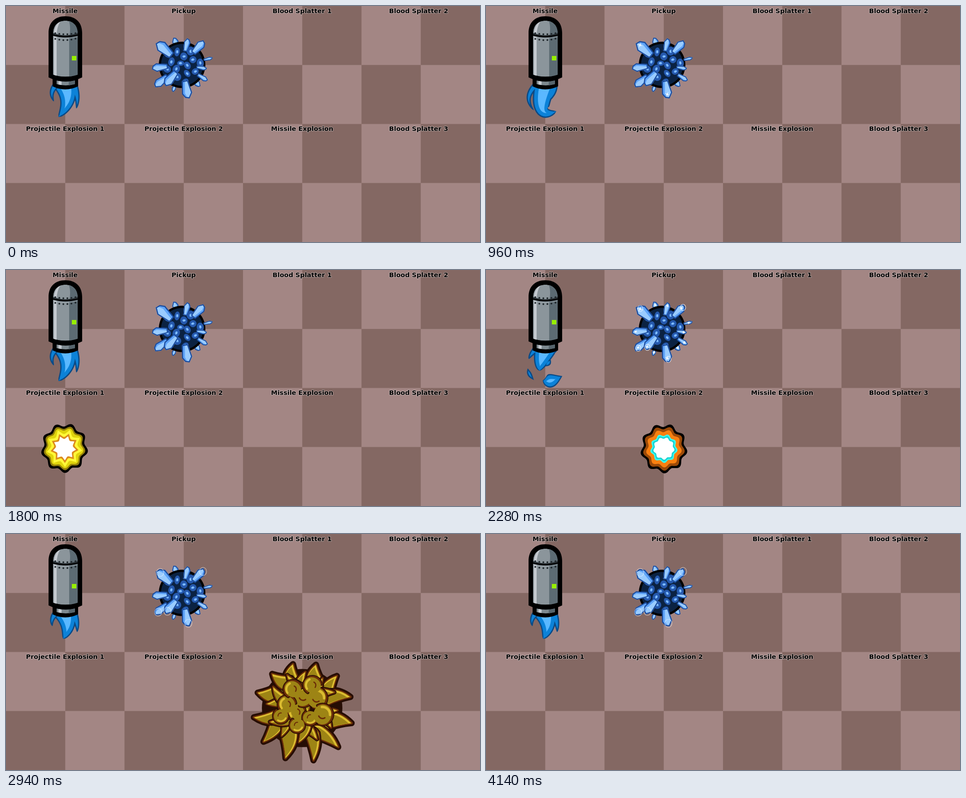
An HTML page with a canvas that plays this animation: 1058 by 529 pixels, repeating every 4.2 s.

```html
<!DOCTYPE html>
<html lang="en">
<head>
<meta charset="utf-8">
<title>Sprite sheet</title>
<style>
html, body { margin: 0; width: 100%; height: 100%; overflow: hidden; background: #846863; }
canvas { display: block; }
</style>
</head>
<body>
<canvas id="stage" width="1058" height="529"></canvas>
<script>
const g = document.getElementById('stage').getContext('2d');
const STEP = 60, STEPS = 70, CELL = 264.5, TAU = Math.PI * 2, GOLDEN = 2.4;

const LABELS = ['Missile', 'Pickup', 'Blood Splatter 1', 'Blood Splatter 2',
  'Projectile Explosion 1', 'Projectile Explosion 2', 'Missile Explosion', 'Blood Splatter 3'];
const LABEL_X = [132, 396.5, 661, 921];

const mix = (a, b, k) => a + (b - a) * k;
const polar = (x, y, angle, r) => [x + r * Math.cos(angle), y + r * Math.sin(angle)];

function fill(path, color, rule = 'nonzero') {
  g.fillStyle = color;
  g.fill(typeof path === 'string' ? new Path2D(path) : path, rule);
}
function line(path, color, width) {
  g.strokeStyle = color;
  g.lineWidth = width;
  g.stroke(typeof path === 'string' ? new Path2D(path) : path);
}
function oval(x, y, rx, ry = rx, turn = 0) {
  const p = new Path2D();
  p.ellipse(x, y, rx, ry, turn, 0, TAU);
  return p;
}
function arc(x, y, r, from, sweep) {
  const p = new Path2D();
  p.arc(x, y, r, from, from + sweep);
  return p;
}
function polygon(points) {
  const p = new Path2D();
  points.forEach(q => p.lineTo(...q));
  p.closePath();
  return p;
}
function random(seed) {
  return () => (seed = (seed * 16807) % 2147483647) / 2147483647;
}

function drawBoard() {
  const s = CELL / 2;
  for (let y = 0; y < 4; y++) for (let x = 0; x < 8; x++) {
    g.fillStyle = (x + y) % 2 ? '#846863' : '#a38684';
    g.fillRect(x * s, y * s, s + 1, s + 1);
  }
}

function drawLabels() {
  g.font = 'bold 14.4px "DejaVu Sans", sans-serif';
  g.textAlign = 'center';
  g.lineJoin = 'round';
  LABELS.forEach((text, i) => {
    const x = LABEL_X[i % 4], y = i < 4 ? 16 : 280;
    g.strokeStyle = 'rgba(255,255,255,.4)';
    g.lineWidth = 2;
    g.strokeText(text, x, y);
    g.fillStyle = '#000';
    g.fillText(text, x, y);
  });
}

// ---- Missile ----
// Each tongue bends from an early curve (control, end) to a late one.
const TONGUES = [
  { root: 111, width: 15, early: [96, 195, 107, 214], late: [82, 206, 107, 234] },
  { root: 151, width: 18, early: [163, 205, 157, 230], late: [154, 195, 138, 215] },
  { root: 132, width: 48, early: [148, 215, 117, 249], late: [108, 257, 157, 236] }
];

// Tapered strip along the part of a curve between two times.
function ribbon(root, [cx, cy, ex, ey], from, to, width, trim) {
  const left = [], right = [], n = 18;
  for (let i = 0; i <= n; i++) {
    const u = i / n, t = mix(from, to, u), s = 1 - t;
    const x = s * s * root + 2 * s * t * cx + t * t * ex;
    const y = s * s * 178 + 2 * s * t * cy + t * t * ey + (from ? 6 : 0);
    const angle = Math.atan2(s * (cy - 178) + t * (ey - cy), s * (cx - root) + t * (ex - cx)) + Math.PI / 2;
    const half = from ? width * .32 * Math.sin(Math.PI * u) : width / 2 * (1 - u) ** .6;
    const r = Math.max(0, half - trim / 2);
    left.push(polar(x, y, angle, r));
    right.unshift(polar(x, y, angle, -r));
  }
  return polygon([...left, ...right]);
}

function drawFlame(pose) {
  const young = pose === 9, k = young ? 0 : pose / 6, tear = young ? 0 : Math.max(0, pose - 6);
  const parts = tear ? [[0, .5 - .08 * tear], [.42 + .08 * tear, 1]] : [[0, young ? .8 : 1]];
  [['#0b4a86', 0], ['#0c82d8', 6], ['#5ab8ff', 23]].forEach(([color, trim]) => {
    TONGUES.forEach(({ root, width, early, late }) => {
      const curve = early.map((v, i) => mix(v, late[i], k));
      parts.forEach(([a, b]) => fill(ribbon(root, curve, a, b, width, trim), color));
    });
  });
}

function drawMissile() {
  fill('M95 160 V61 C95 36 110 23 132.5 23 C155 23 170 36 170 61 V160 L161 164 V180 Q132 194 104 180 V164Z', '#000');
  const hull = new Path2D('M105 154 V62 C105 43 116 33 132.5 33 C149 33 160 43 160 62 V154 Q132 163 105 154Z');
  g.save();
  g.clip(hull);
  fill(hull, '#8b959b');
  fill('M139 30 Q146 46 141 70 V165 H162 V30Z', '#5c6b73');
  fill('M107 165 V62 Q108 42 121 35 Q113 48 113 66 V165Z', '#c5cad0');
  fill('M105 60 Q132 71 160 60 V67 Q132 75 105 67Z', '#30383d');
  line('M105 65 Q132 72 160 65', '#000', 2.5);
  line('M105 69 Q132 76 160 69', '#a6afb5', 1);
  g.restore();
  for (let i = 0; i < 6; i++) {
    const x = 110 + i * 9, dip = 3 - ((x - 132) / 13) ** 2;
    fill(oval(x, 61 + dip * .8, 2), '#20282c');
    fill(oval(x, 73.5 + dip, 2), '#20282c');
  }
  fill('M113 167 Q133 172 154 167 V175 Q133 181 113 175Z', '#7e898f');
  fill('M117 168 L124 169 V177 L117 176Z', '#c5cad0');
  fill('M140 170 L154 167 V175 L140 178Z', '#56646c');
  fill('M147 112 h10 v10 h-10Z', '#96f000');
}

// ---- Pickup ----
const BALL = [393, 132];
// angle in degrees, reach, width
const SHARDS = [[254, 64, 14], [51, 63, 13], [109, 64, 9], [222, 76, 26], [283, 61, 15], [313, 73, 20],
  [347, 70, 8], [9, 56, 10], [32, 67, 12], [142, 78, 20], [174, 68, 19], [130, 60, 22], [80, 77, 23]]
  .map(([deg, reach, width]) => ({ angle: deg * TAU / 360, reach, width }));
const BIG = SHARDS.filter(s => s.width > 19);

function drawShard({ angle, reach, width }) {
  const len = 10 + 1.35 * width, h = width / 2;
  g.save();
  g.translate(...polar(...BALL, angle, reach - len));
  g.rotate(angle);
  const p = polygon([[0, -h * .6], [len * .7, -h], [len, -h * .3], [len * .93, h * .5], [len * .7, h], [0, h * .6]]);
  g.clip(p);
  fill(p, '#5fa4f8');
  fill(polygon([[0, 0], [len * .68, h * .4], [len, 0], [len, -h], [0, -h]]), '#9accff');
  line(p, '#1a4a9c', 2.5 + width * .1);
  g.restore();
}

function drawPickup() {
  SHARDS.slice(0, 3).forEach(drawShard);
  fill(oval(...BALL, 52), '#000');
  fill(oval(...BALL, 47), '#0b2242');
  for (let i = 0; i < 15; i++) {
    const [x, y] = polar(...BALL, i * GOLDEN + 4, 42 * Math.sqrt((i + .2) / 15));
    fill(oval(x, y, 8 + i % 3, 6 + i % 4, i), '#2558ac');
    g.save();
    g.translate(x, y);
    g.rotate(i);
    fill('M-4 -2 L1 -3 L4 0 L1 3 L-4 2Z', '#5fa4f8');
    fill('M-3 -1 L1 -2 L2 0 L-2 1Z', '#9accff');
    g.restore();
  }
  SHARDS.slice(3).forEach(drawShard);
}

function drawGlints(pose) {
  if (pose < 6) return;
  const lit = pose === 6 ? [SHARDS[3], SHARDS[12]] : pose < 9 ? SHARDS : [];
  lit.forEach(({ angle, reach, width }) => {
    const r = width > 22 ? 6 : 4;
    g.save();
    g.translate(...polar(...BALL, angle, reach * .87));
    g.rotate(.35);
    fill(polygon([[0, -r], [1, -1], [r, 0], [1, 1], [0, r], [-1, 1], [-r, 0], [-1, -1]]), '#fff');
    g.restore();
  });
  const grow = pose - 8;
  if (grow >= 0) BIG.forEach(({ angle, reach }) => {
    const [x, y] = polar(...BALL, angle, reach * .9);
    line(oval(x + 2, y, 6 + 2 * grow, 7 + 2 * grow), `rgba(255,255,255,${.75 - grow * .2})`, 1.2);
  });
}

// ---- Projectile explosions ----
function lobes(cx, cy, size, sharp) {
  const points = [];
  for (let i = 0; i < 180; i++) {
    const a = i / 180 * TAU, turn = 4.5 * (a - .14);
    const wave = sharp ? .15 * (1 - 2 * Math.abs(Math.sin(turn))) : .075 * Math.cos(2 * turn);
    const r = size * (1 + wave);
    points.push([cx + 49 * r * Math.cos(a), cy + 52 * r * Math.sin(a)]);
  }
  return polygon(points);
}

const YELLOWS = { sharp: true, sizes: [1, .89, .81, .71, .56, .46],
  colors: ['#000', '#94800a', '#e0d40c', '#fff838', '#dc8c1c', '#fff'] };
const ORANGES = { sharp: false, sizes: [1, .89, .76, .58, .52, .45],
  colors: ['#000', '#9c4a08', '#fa8010', '#38fff4', '#18d4d4', '#fff'] };

function drawBurst(k, cx, cy, { sharp, sizes, colors }) {
  const size = k ? 1.84 - .84 * Math.exp(1 - k) ** .8 : .6;
  const hole = k < 3 ? 0 : 1 - .55 * .55 ** (k - 3);
  sizes.forEach((s, i) => {
    const inner = hole && hole + i * .025;
    if (s <= inner) return;
    const p = lobes(cx, cy, s * size, sharp && i > 2);
    if (inner) p.addPath(lobes(cx, cy, inner * size));
    fill(p, colors[i], 'evenodd');
  });
}

// ---- Missile explosion ----
function horn(angle, reach, base, w, bend) {
  const [x, y] = polar(0, 0, angle, reach), [bx, by] = polar(0, 0, angle + bend, base);
  const back = Math.atan2(by - y, bx - x), side = back + Math.PI / 2;
  const mid = [(x + bx) / 2, (y + by) / 2];
  const path = new Path2D();
  path.moveTo(x, y);
  path.quadraticCurveTo(...polar(...mid, side, w * .65), ...polar(bx, by, side, w / 2));
  path.quadraticCurveTo(...polar(bx, by, back, w * .8), ...polar(bx, by, side, -w / 2));
  path.quadraticCurveTo(...polar(...mid, side, -w * .15), x, y);
  return path;
}

const HEAT = [
  ['#7a2c04', '#f58a10', '#ffe040', '#ffffff'],
  ['#4a1a04', '#c05a0c', '#f0c020', '#fff27a'],
  ['#260d04', '#6b2d08', '#9d8415', '#dcbc30'],
  ['#1a0a04', '#3c1a08', '#5a4410', '#80681a']
];

function drawBlast(k) {
  const size = 1.08 - .58 * Math.exp(-k * .8);
  const [edge, rim, body, shine] = HEAT[Math.floor(k / 2) > 3 ? 3 : Math.floor(k / 2)];
  const thin = Math.min(1, (9 - k) / 4);
  const outer = [], inner = [];
  for (let i = 0; i < 12; i++) {
    const a = -1.78 + i * TAU / 12, reach = 103 - 11 * Math.cos(i * TAU / 12);
    outer.push(horn(a, reach, mix(reach, 58, thin), (30 + 5 * Math.sin(i * 2)) * thin, i % 3 ? .2 : -.15));
    inner.push(horn(a + .3, 74, mix(74, 38, thin), 21 * thin, i % 2 ? .35 : -.3));
  }
  g.save();
  g.translate(661, 388);
  g.scale(size, size);
  g.lineJoin = g.lineCap = 'round';
  if (thin === 1) fill(oval(0, 2, 84, 82), edge);
  outer.forEach(p => line(p, edge, 13 * thin));
  [...outer, ...inner].forEach(p => {
    line(p, edge, 9 * thin);
    line(p, rim, 5 * thin);
    fill(p, body);
    g.save();
    g.clip(p);
    g.translate(-2, 2);
    line(p, shine, 4 * thin);
    g.restore();
  });
  for (let i = 0; i < 11; i++) {
    const [x, y] = polar(0, 0, i * GOLDEN, 16 * Math.sqrt(i)), r = (15 + i % 3 * 3) * thin, a = i * 2.1;
    line(arc(x, y, r, a, 4), edge, 7 * thin);
    line(arc(x, y, r, a, 4), rim, 4 * thin);
    fill(oval(x, y, r, r * .9, i), body);
    line(arc(x, y, r * .75, a + .4, 1.7), shine, r * .25);
    line(arc(x, y, r * .4, a + 3, 1.8), rim, r * .14);
  }
  g.restore();
}

// ---- Blood ----
function drawBlood(k, count, cx, cy, seed, reach) {
  const rnd = random(seed), t = (k + 1) / count;
  const spread = 1 - (1 - t) ** 2, bulk = Math.sin(Math.PI * Math.min(.95, t * .8 + .15));
  const drops = [];
  for (let i = 0; i < 20; i++) {
    const a = rnd() * TAU, d = reach * (.25 + .7 * rnd()) * spread, r = (4 + 11 * rnd()) * bulk;
    const [x, y] = polar(cx, cy, a, d);
    drops.push([x, y + 12 * t * t, r * 1.7, r, a]);
  }
  if (t < .7) drops.push([cx, cy, 38 * bulk, 32 * bulk, seed]);
  drops.forEach(([x, y, rx, ry, a]) => fill(oval(x, y, rx + 3, ry + 3, a), '#3a0606'));
  drops.forEach(([x, y, rx, ry, a]) => fill(oval(x, y, rx, ry, a), '#a01414'));
}

// first step, length, painter
const EFFECTS = [
  [10, 6, k => drawBlood(k, 6, 661, 132, 11, 82)],
  [20, 7, k => drawBlood(k, 7, 926, 138, 47, 112)],
  [29, 7, k => drawBurst(k, 130.5, 399, YELLOWS)],
  [37, 7, k => drawBurst(k, 397, 400, ORANGES)],
  [44, 9, drawBlast],
  [60, 7, k => drawBlood(k, 7, 926, 392, 83, 104)]
];

function draw(step) {
  const pose = step % 10;
  drawBoard();
  drawFlame(pose);
  drawMissile();
  drawPickup();
  drawGlints(pose);
  for (const [start, length, paint] of EFFECTS) {
    if (step >= start && step < start + length) paint(step - start);
  }
  drawLabels();
}

let shown = -1;
function tick() {
  const step = Math.floor(performance.now() / STEP) % STEPS;
  if (step !== shown) draw(shown = step);
  requestAnimationFrame(tick);
}
tick();
</script>
</body>
</html>
```
